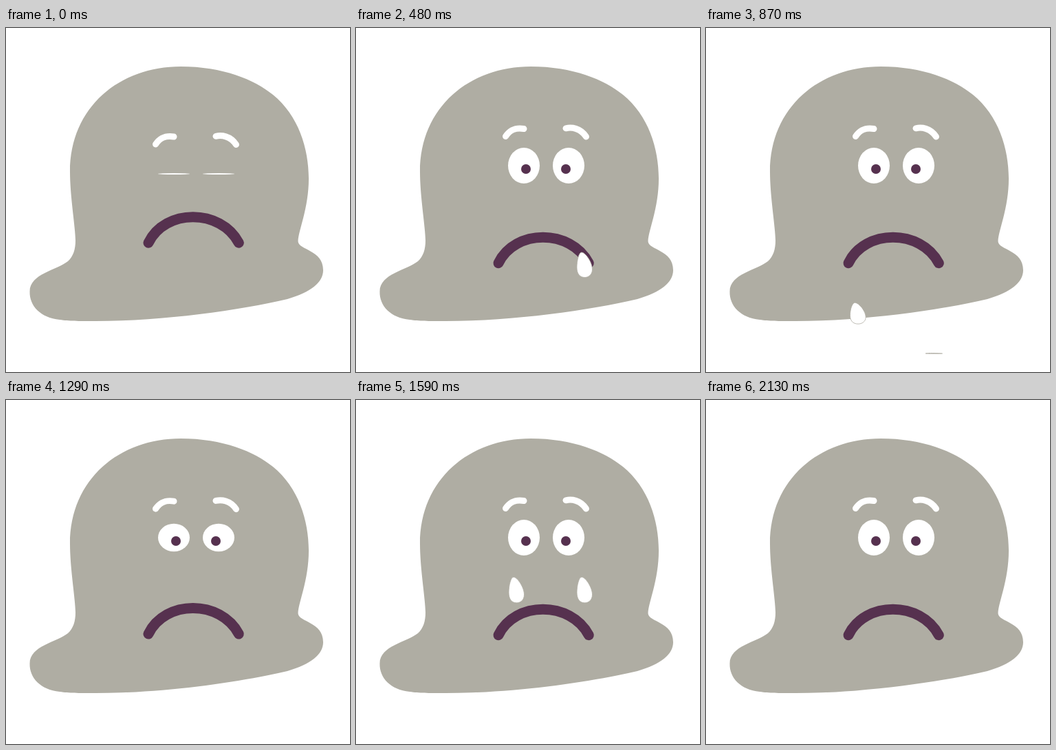
An HTML page for the animation above (2760 ms loop, 500 by 500 pixels).

```html
<!DOCTYPE html>
<html lang="en">
<head>
<meta charset="utf-8">
<title>Sad blob</title>
<style>
html, body { margin: 0; width: 100%; height: 100%; overflow: hidden; background: #fff; }
svg { display: block; width: 100vw; height: 100vh; }
.line { fill: none; stroke-linecap: round; }
.tear { fill: #fff; stroke: #afada3; stroke-width: .8; vector-effect: non-scaling-stroke; }
</style>
</head>
<body>
<svg viewBox="0 0 500 500">
  <defs>
    <path id="drop" class="tear" d="M-4-37.5C2-37 11.5-22 11.5-12C11.5-4 6 0 .5 0C-7 0-11-6-11-15C-11-25-8-37.5-4-37.5Z"/>
  </defs>
  <path fill="#afada3" d="M254 56C315 56 361 75 388 97C425 127 440 175 440 219C440 262 425 294 424.5 310C425 323 461 322 461 352C461 370 443 384 409 394C340 410 230 426 130 426C104 426 92 426 78 424C50 421 34 404 34.5 383C34.5 357 74 352 90 339C98 332 101 321 101 309C101 290 93 245 93 209C93 115 165 56 254 56Z"/>
  <g id="brows" class="line" stroke="#fff" stroke-width="9">
    <path d="M217.5 157.5C224 148 232 144.5 244 146.5"/>
    <path d="M305 145.8C313 144 326 145 334.5 158"/>
  </g>
  <g id="eyes" fill="#fff">
    <ellipse cx="244" rx="23" ry="26"/>
    <ellipse cx="309" rx="23" ry="26"/>
  </g>
  <g id="pupils" fill="#56314f">
    <circle cx="247" r="7"/>
    <circle cx="305" r="7"/>
  </g>
  <path id="mouth" class="line" stroke="#56314f" stroke-width="15" d="M207 341.7C231 291.7 312 291.7 338.3 341.7"/>
  <g id="tears"></g>
</svg>
<script>
const LOOP = 2760, STEP = 30;
const el = id => document.getElementById(id);
const move = (node, value) => node.setAttribute('transform', value);
const clamp = x => Math.min(1, Math.max(0, x));
const ease = x => x < .5 ? 2 * x * x : 1 - 2 * (1 - x) ** 2;
const ramp = (t, from, to) => ease(clamp((t - from) / (to - from)));

const tears = [
  { start: 240, x: 332, drift: -1 },
  { start: 540, x: 221, drift: -2.5 },
  { start: 1440, x: 233, drift: -2.5 },
  { start: 1440, x: 332, drift: -1 }
];
for (const tear of tears) {
  tear.node = document.createElementNS('http://www.w3.org/2000/svg', 'g');
  tear.node.append(el('drop').cloneNode());
  tear.node.firstChild.removeAttribute('id');
  el('tears').append(tear.node);
}

// How far a part is squeezed: 0 relaxed, 1 shut
function squeeze(t, closeAt, openBy) {
  if (t < 1200) return 1 - ramp(t, 0, 240);
  return t < 1350 ? ramp(t, closeAt, 1350) : 1 - ramp(t, 1350, openBy);
}

function drawTear({ node, start, x, drift }, t) {
  const age = t - start;
  const shown = age > 0 && age < 690;
  node.setAttribute('visibility', shown ? 'visible' : 'hidden');
  if (!shown) return;
  const grow = ramp(age, 0, 100);
  const flat = ramp(age, 180, 690);
  const y = 251.5 + 222 * ramp(age, 0, 480);
  move(node, `translate(${x + drift * flat} ${y}) scale(${grow * (1 + .09 * flat)} ${grow * (1 - flat)})`);
}

function draw(t) {
  const lids = squeeze(t, 1260, 1530);
  const pupils = squeeze(t, 1285, 1530);
  const frown = squeeze(t, 1278, 1520);
  const lidDrop = t < 1200 ? 12 * lids : 0;
  move(el('eyes'), `translate(0 ${200 + lidDrop}) scale(1 ${Math.max(.035, 1 - lids)})`);
  move(el('pupils'), `translate(0 205) scale(1 ${1 - pupils})`);
  move(el('brows'), `translate(0 ${11.5 * frown})`);
  move(el('mouth'), `translate(0 ${-29.5 * frown})`);
  for (const tear of tears) drawTear(tear, t);
}

const begin = performance.now();
function tick() {
  const t = (performance.now() - begin) % LOOP;
  draw(Math.min(2130, Math.floor(t / STEP) * STEP));
  requestAnimationFrame(tick);
}
tick();
</script>
</body>
</html>
```
